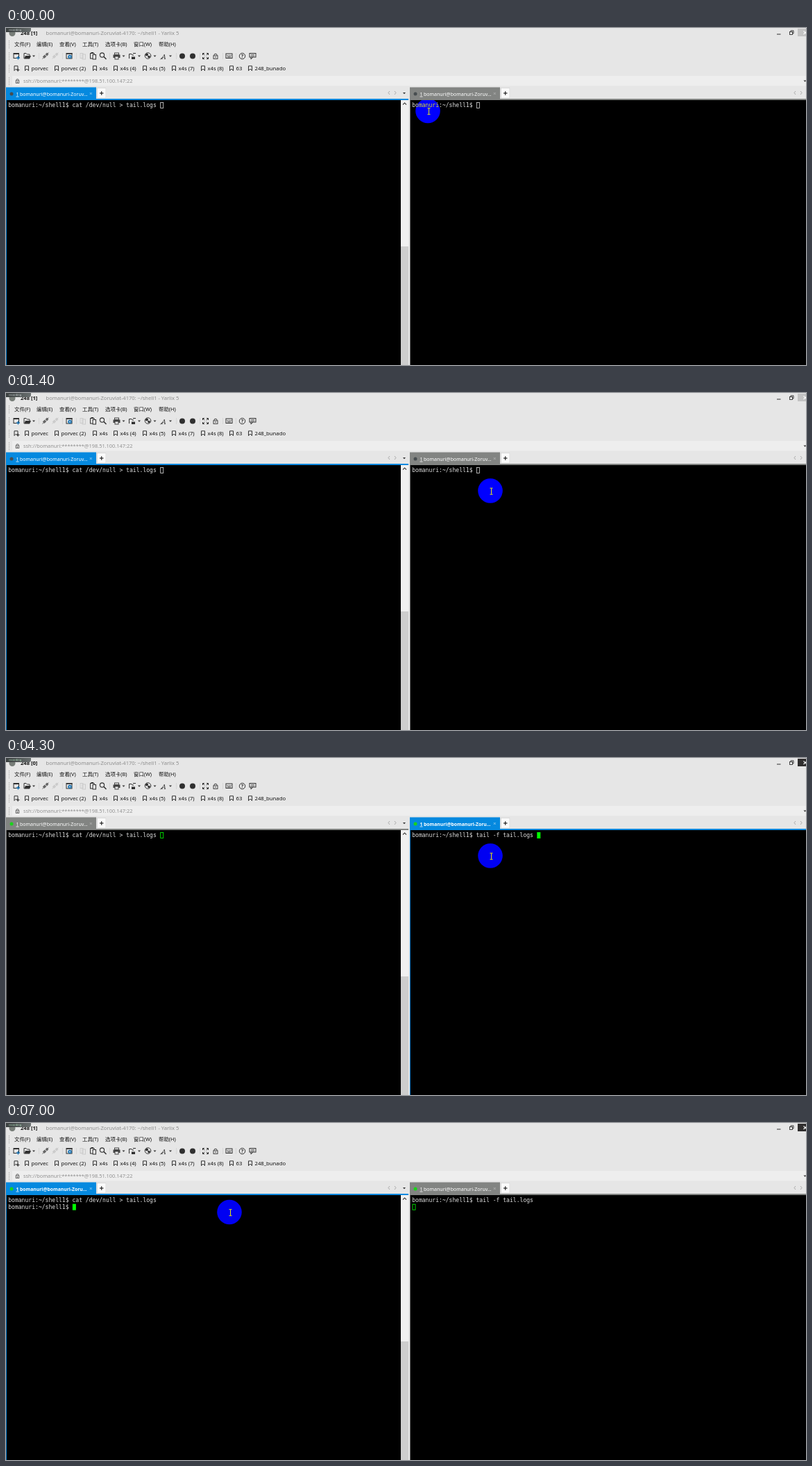
These frames come from a looping animation (1153 px wide and 486 px high, 8000 ms). An HTML page with a canvas:

```html
<!DOCTYPE html>
<html lang="zh-CN">
<head>
<meta charset="utf-8">
<style>
html, body { margin: 0; width: 100%; height: 100%; overflow: hidden; background: #e6e6e6; }
canvas { display: block; }
</style>
</head>
<body>
<canvas id="stage" width="1153" height="486"></canvas>
<script>
const ctx = document.getElementById('stage').getContext('2d');
const LOOP = 8000, STEP = 100;
const UI = '"Noto Sans", "Noto Sans CJK SC", "Noto Sans CJK", sans-serif';
const MONO = '"DejaVu Sans Mono", monospace';
const BG = '#e6e6e6', INK = '#303030', FAINT = '#cbcbcb';
const BLUE = '#0589df', GREY = '#828482', GREEN = '#00ff00';
const CELL = 4.86, ROW = 9.7;
const USER = 'bomanuri', HOST = USER + '@' + USER + '-Zoruvlat-4170';
const PROMPT = USER + ':~/shell1$ ';

// time, x, y
const PATH = [
  [100, 608, 119.5], [1000, 655, 114.5], [1400, 698, 141],
  [5500, 698, 141], [5600, 463.5, 127.5], [5900, 322, 128.5]
];

function rect(x, y, w, h, color) {
  ctx.fillStyle = color;
  ctx.fillRect(x, y, w, h);
}

function text(str, x, y, size, color = '#111', weight = '', family = UI) {
  ctx.font = `${weight} ${size}px ${family}`;
  ctx.fillStyle = color;
  ctx.fillText(str, x, y);
}

function disc(x, y, r, color) {
  ctx.fillStyle = color;
  ctx.beginPath();
  ctx.arc(x, y, r, 0, 7);
  ctx.fill();
}

function ring(x, y, r, color = INK, width = 1) {
  ctx.strokeStyle = color;
  ctx.lineWidth = width;
  ctx.beginPath();
  ctx.arc(x, y, r, 0, 7);
  ctx.stroke();
}

function line(points, color = INK, width = 1) {
  ctx.strokeStyle = color;
  ctx.lineWidth = width;
  ctx.beginPath();
  for (let i = 0; i < points.length; i += 2) ctx.lineTo(points[i], points[i + 1]);
  ctx.stroke();
}

function box(x, y, w, h, color = INK, width = 1) {
  ctx.strokeStyle = color;
  ctx.lineWidth = width;
  ctx.strokeRect(x, y, w, h);
}

function down(x, y) {
  ctx.fillStyle = INK;
  ctx.beginPath();
  ctx.moveTo(x - 2, y - 1);
  ctx.lineTo(x + 2, y - 1);
  ctx.lineTo(x, y + 1.3);
  ctx.fill();
}

function chevron(x, y, dir, color) {
  line([x - dir, y - 2.5, x + dir, y, x - dir, y + 2.5], color);
}

function bookmark(x) {
  line([x - 2.5, 61.5, x - 2.5, 54.8, x + 2.5, 54.8, x + 2.5, 61.5, x, 59, x - 2.5, 61.5], INK, 1);
}

function lock(x, y, w, color) {
  box(x - w / 2 + 0.5, y - 0.5, w - 1, w * 0.65, color, 0.9);
  rect(x - 0.5, y + 0.8, 1, 1.8, color);
  ctx.beginPath();
  ctx.arc(x, y - 1, w * 0.3, Math.PI, 0);
  ctx.stroke();
}

function plug(x, color) {
  line([x - 4.5, 44.5, x - 2.5, 42.5], color);
  line([x - 3, 42.7, x, 39.8], color, 3.6);
  line([x + 0.8, 39.2, x + 3.2, 36.8], color, 3.4);
  line([x + 3, 37, x + 4.5, 35.5], color);
}

function toolbar() {
  box(11, 36.5, 7.5, 7, INK);
  rect(11, 36, 8, 2, INK);
  line([15, 43, 20, 43], '#1673b5', 1.4);
  line([17.5, 40.5, 17.5, 45.5], '#1673b5', 1.4);

  line([26, 44, 26, 36.5, 29, 36.5, 30.5, 38, 34, 38, 34, 40], INK);
  ctx.fillStyle = INK;
  ctx.beginPath();
  ctx.moveTo(28, 40);
  ctx.lineTo(36, 40);
  ctx.lineTo(34, 44.5);
  ctx.lineTo(26, 44.5);
  ctx.fill();

  plug(57, '#666');
  plug(71, FAINT);

  box(87, 36.5, 8, 7.5, INK);
  rect(87, 36, 8.5, 1.8, INK);
  disc(92, 41.5, 2.7, '#1673b5');
  disc(92, 41.5, 1, BG);

  box(107, 36.5, 4, 7, FAINT);
  box(110, 38, 4.5, 7, FAINT);
  box(121.5, 36.5, 5.5, 7.5, INK);
  rect(122.5, 35, 3.5, 2, INK);
  rect(125, 38.5, 4.5, 6.5, BG);
  box(125, 38.5, 4.5, 6.5, INK);
  ring(138.5, 39, 3.1, INK, 1.1);
  line([140.8, 41.3, 144.5, 45], INK, 1.5);

  rect(154.5, 38.5, 10, 4.5, '#444');
  box(156.5, 36, 6, 2.5, '#444');
  rect(157, 41, 5, 4, BG);
  box(157, 41, 5, 4, '#444');

  line([177.5, 44, 177.5, 37.5, 181, 37.5, 182, 39, 184, 39], INK);
  rect(181, 41.5, 5, 3.5, INK);
  line([183, 36.5, 187, 36.5], INK);

  ring(204.5, 40, 4.3, INK, 1);
  disc(203, 38.5, 2, INK);
  disc(206, 41.5, 1.7, INK);
  text('A', 224, 44.5, 9.5, INK, 'italic', '"Noto Serif", serif');
  line([222.5, 45, 226, 42], INK);

  disc(254, 40.5, 4, INK);
  disc(269, 40.5, 4, INK);

  for (const sx of [-1, 1]) for (const sy of [-1, 1]) {
    line([287.5 + sx * 1.3, 40.5 + sy * 1.3, 287.5 + sx * 4, 40.5 + sy * 4]);
    line([287.5 + sx * 1.5, 40.5 + sy * 4, 287.5 + sx * 4, 40.5 + sy * 4, 287.5 + sx * 4, 40.5 + sy * 1.5]);
  }
  lock(302, 40.3, 7, INK);
  box(317, 37, 9, 6.5, INK);
  for (let i = 0; i < 3; i++) rect(318.7 + i * 2.3, 39, 1.2, 1.2, INK);
  rect(319, 41.2, 5, 1, INK);
  ring(340.5, 40.5, 4.2);
  text('?', 338.7, 43.3, 7.5, INK, 'bold');
  box(351, 36.5, 9, 5.5, INK);
  line([353, 42, 353, 45, 356, 42]);
  line([353, 38.5, 358, 38.5], INK, 0.7);
  line([353, 40.3, 358, 40.3], INK, 0.7);

  for (const x of [40, 169.5, 192, 214.5, 237]) down(x, 40.5);
  for (const x of [47, 81, 101, 149, 245, 279, 312, 331]) rect(x, 36, 1, 9, '#d6d6d6');
}

function chrome(t, active) {
  rect(0, 0, 1153, 486, BG);

  disc(9, 7.5, 4.5, '#777d78');
  const count = t >= 2700 && t < 6100 ? 0 : 1;
  text(`248 [${count}]`, 21, 10.2, 7.6, '#111', 'bold');
  text(HOST + ': ~/shell1 - Yarlix 5', 57.5, 10.3, 7.55, '#8d8d8d');

  // recorder badge
  const g = ctx.createLinearGradient(0, 0, 36, 0);
  g.addColorStop(0, '#3b4040');
  g.addColorStop(1, '#6a7070');
  ctx.fillStyle = g;
  ctx.beginPath();
  ctx.roundRect(-4, -4, 40, 10, 3);
  ctx.fill();
  text('recording', 4, 4, 4, active ? '#a9d8b4' : '#c4cccc');

  rect(1111, 8.5, 5.5, 1, INK);
  box(1129.5, 5.5, 4, 4, INK, 0.9);
  line([1131, 5, 1131, 3.8, 1135, 3.8, 1135, 8, 1134, 8], INK, 0.9);
  rect(1141, 1, 12, 11, active ? '#302e2e' : '#c3c3c3');
  line([1149.5, 4.5, 1154, 9], '#fff', 1.1);
  line([1149.5, 9, 1154, 4.5], '#fff', 1.1);

  const menu = { 12: '文件(F)', 44: '编辑(E)', 77: '查看(V)', 110: '工具(T)', 143: '选项卡(B)', 184: '窗口(W)', 220: '帮助(H)' };
  for (const x in menu) text(menu[x], +x, 26, 7.4);

  toolbar();

  bookmark(14.5);
  line([15, 60.5, 19.5, 60.5], INK);
  line([17.2, 58.2, 17.2, 62.8], INK);
  const links = { 30: 'porvec', 73: 'porvec (2)', 128: 'x4s', 158: 'x4s (4)', 200: 'x4s (5)', 242: 'x4s (7)', 284: 'x4s (8)', 325: '63', 352: '248_bunado' };
  for (const x in links) {
    bookmark(+x);
    text(links[x], +x + 6.5, 61, 7.7);
  }

  rect(9, 69, 1144, 14.5, '#eeeeee');
  lock(16.5, 76.3, 5.5, '#555');
  text(`ssh://${USER}:********@198.51.100.147:22`, 25, 79, 7.4, '#919191');
  down(1151.5, 76.5);

  for (const y of [18, 35, 53, 71])
    for (let i = 0; i < 5; i++) rect(4, y + i * 2.5, 1, 1.2, '#a5a5a5');
}

function cursor(x, y, solid, color) {
  if (solid) rect(x, y, 5, 9, color);
  else box(x + 0.5, y + 0.5, 4, 8, color, 0.8);
}

function pane(x, right, focus, active, rows) {
  const color = focus ? BLUE : GREY;
  const bold = focus && active;
  rect(x, 85.5, 130, 16.5, color);
  rect(x, 102, right - x, 2, color);
  disc(x + 8, 95, 2.5, active ? '#1bd31b' : '#474d50');
  const size = bold ? 6.8 : 7;
  const weight = bold ? 'bold' : '';
  text('1', x + 14.5, 97.6, size, '#fff', weight);
  rect(x + 14.5, 98.6, 4, 0.8, '#fff');
  text(HOST.slice(0, bold ? 22 : 23) + '...', x + 20, 97.6, size, '#fff', weight);
  const cross = focus ? '#9fd2f3' : '#b5b5b5';
  line([x + 120.8, 93, x + 123.8, 96], cross, 0.8);
  line([x + 120.8, 96, x + 123.8, 93], cross, 0.8);

  rect(x + 131, 86, 13.5, 15.5, '#fafafa');
  box(x + 131.5, 86.5, 12.5, 14.5, '#d2d2d2', 0.8);
  line([x + 135, 94, x + 140.5, 94], '#222', 1.2);
  line([x + 137.7, 91.3, x + 137.7, 96.7], '#222', 1.2);

  const edge = x ? right - 8 : right - 20;
  chevron(edge - 8, 93.5, -1, '#aaa');
  chevron(edge + 1, 93.5, 1, '#aaa');

  rect(x, 104, right - x, 382, '#000');
  rect(x, 104, 1, 382, focus ? '#0878c4' : '#6a6a6a');
  rows.forEach((row, i) => text(row, x + 3.2, 114.3 + i * ROW, CELL / 0.602, '#dedede', '', MONO));
  const last = rows.length - 1;
  const cx = x + 3.5 + rows[last].length * CELL;
  cursor(cx, 107 + last * ROW, bold, active ? GREEN : '#dedede');
}

function scrollbar() {
  rect(569, 104, 11, 211, '#f0f0f0');
  rect(569, 315, 11, 171, '#cdcdcd');
  line([572, 110.5, 574.5, 108, 577, 110.5], '#444', 1.1);
  down(574, 94);
}

function mouseAt(t) {
  let a = PATH[0];
  for (const b of PATH) {
    if (t < b[0]) {
      const k = Math.max(0, (t - a[0]) / (b[0] - a[0]));
      return [a[1] + (b[1] - a[1]) * k, a[2] + (b[2] - a[2]) * k];
    }
    a = b;
  }
  return [a[1], a[2]];
}

// The highlight inverts blue, so it vanishes over grey.
function pointer(t) {
  const [x, y] = mouseAt(t);
  const ix = Math.round(x + 1) + 0.5, iy = y + 0.7;
  line([ix, iy - 4, ix, iy + 4], '#eee');
  line([ix - 2, iy - 4.5, ix + 2, iy - 4.5], '#eee');
  line([ix - 2, iy + 4.5, ix + 2, iy + 4.5], '#eee');
  if ((t >= 2300 && t < 2500) || t === 6000) ring(x, y + 0.5, 3.7, '#ddd');
  ctx.globalCompositeOperation = 'difference';
  disc(x, y, 17.8, t < 2400 ? '#00f' : '#0000f2');
  ctx.globalCompositeOperation = 'source-over';
}

function rightRows(t) {
  if (t < 3200) return [PROMPT];
  if (t < 3300) return [PROMPT + 'cle'];
  if (t < 4200) return [PROMPT + 'clear'];
  if (t < 4300) return [PROMPT];
  const cmd = PROMPT + 'tail -f tail.logs ';
  return t < 4700 ? [cmd] : [cmd, ''];
}

function leftRows(t) {
  const cmd = PROMPT + 'cat /dev/null > tail.logs ';
  return t < 6900 ? [cmd] : [cmd, PROMPT];
}

function draw(t) {
  const active = t >= 2400;
  const onRight = active && t < 6000;
  chrome(t, active);
  pane(0, 580, !onRight, active, leftRows(t));
  pane(582, 1153, onRight, active, rightRows(t));
  scrollbar();
  pointer(t);
}

const start = performance.now();
function tick() {
  const t = (performance.now() - start) % LOOP;
  draw(Math.floor(t / STEP) * STEP);
  requestAnimationFrame(tick);
}
tick();
</script>
</body>
</html>
```
